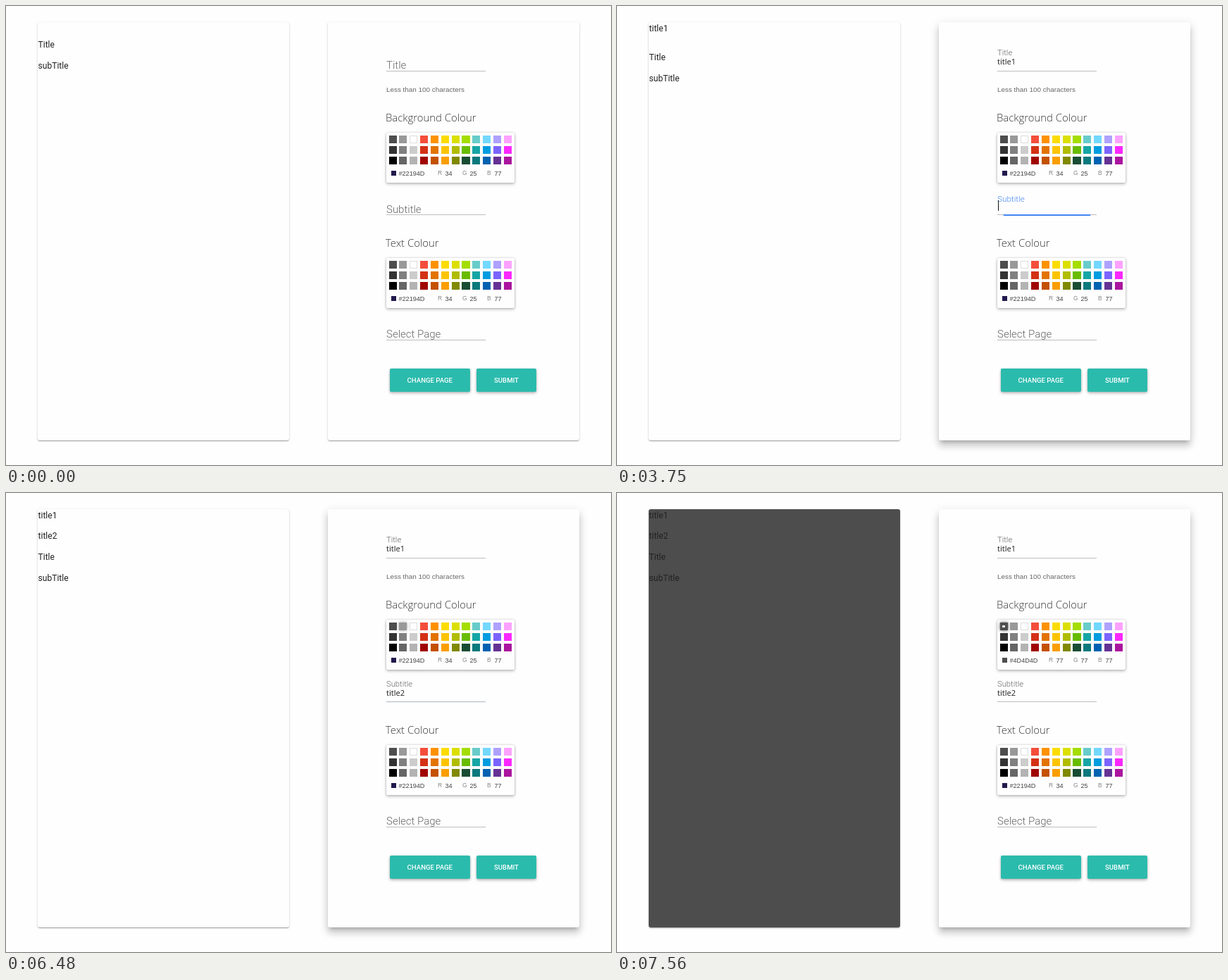
Write an HTML page that moves like this. It is 859 px wide and 652 px high and loops after 8000 ms.

```html
<!DOCTYPE html>
<html lang="en">
<head>
<meta charset="utf-8">
<title>Live form preview</title>
<style>
  html, body { margin: 0; width: 100%; height: 100%; overflow: hidden; background: #fefefe; }
  #stage { position: relative; width: 859px; height: 652px; overflow: hidden; font-family: Roboto, sans-serif; }
  #stage div, #stage i { position: absolute; box-sizing: border-box; }
  .text { line-height: 20px; white-space: pre; }
  .card {
    top: 23px; width: 357px; height: 593.5px; border-radius: 3px; background: #fefefe;
    box-shadow: 0 1px 3px rgba(0,0,0,.2), 0 1px 1px rgba(0,0,0,.14), 0 2px 1px -1px rgba(0,0,0,.12);
  }
  .card.raised { box-shadow: 0 5px 5px -3px rgba(0,0,0,.2), 0 8px 10px 1px rgba(0,0,0,.14), 0 3px 14px 2px rgba(0,0,0,.08); }
  .preview { font-size: 12.1px; color: #222; }
  .heading { font: 300 14.9px/20px "Open Sans", sans-serif; color: #333; }
  .hint { font: 9.9px/20px "Liberation Sans", Arial, sans-serif; color: #666; }
  .label { font-size: 15px; font-weight: 300; color: #666; transform-origin: 0 50%; }
  .input { font: 11.1px/20px "Open Sans", sans-serif; color: #222; }
  .caret { width: 1px; height: 15px; margin-left: 1px; top: 2px; background: #111; }
  .line { left: 540px; width: 141px; height: 1px; background: #bdbdbd; }
  .focus { left: 540px; width: 141px; height: 2px; background: #4285f4; }
  .picker {
    left: 540px; width: 182px; height: 71px; border-radius: 2px; background: #fefefe;
    box-shadow: 0 2px 4px rgba(0,0,0,.25), 0 0 3px rgba(0,0,0,.18);
  }
  .swatch { width: 11.1px; height: 11.1px; }
  .dot { left: 3.7px; top: 3.7px; width: 3.7px; height: 3.7px; border-radius: 1px; }
  .sample { left: 7px; top: 54px; width: 6.5px; height: 6.5px; }
  .value { font: 9.1px/20px "Liberation Sans", Arial, sans-serif; color: #444; overflow: hidden; }
  .channel { font: 8.5px/20px "Liberation Sans", Arial, sans-serif; color: #888; }
  .menu {
    left: 540px; width: 190px; overflow: hidden; border-radius: 2px; background: #fefefe;
    box-shadow: 0 2px 4px rgba(0,0,0,.22), 0 0 3px rgba(0,0,0,.18);
  }
  .option { left: 12px; font: 12.4px/20px "Open Sans", sans-serif; color: #111; }
  .button {
    top: 514.5px; height: 33.5px; border-radius: 2px; background: #2bbbad; color: #fff;
    font-size: 9.6px; font-weight: 500; line-height: 33px; text-align: center;
    box-shadow: 0 2px 4px rgba(0,0,0,.22), 0 1px 3px rgba(0,0,0,.14);
  }
</style>
</head>
<body>
<div id="stage"></div>
<script>
const LOOP = 8000, PITCH = 35.7, INDIGO = '#22194D';
const stage = document.getElementById('stage');

const COLORS = (
  '4D4D4D 999999 FFFFFF F44E3B FE9200 FCDC00 DBDF00 A4DD00 68CCCA 73D8FF AEA1FF FDA1FF ' +
  '333333 808080 CCCCCC D33115 E27300 FCC400 B0BC00 68BC00 16A5A5 009CE0 7B64FF FA28FF ' +
  '000000 666666 B3B3B3 9F0500 C45100 FB9E00 808900 194D33 0C797D 0062B1 653294 AB149E'
).split(' ').map(c => '#' + c);

function add(parent, cls, style = {}, content = '') {
  const el = document.createElement('div');
  el.className = cls;
  el.textContent = content;
  for (const [k, v] of Object.entries(style))
    el.style[k] = typeof v === 'number' ? v + 'px' : v;
  return parent.appendChild(el);
}

// y is the middle of the capital letters
const text = (parent, cls, x, y, content) =>
  add(parent, 'text ' + cls, { left: x, top: y - 10 }, content);

const within = (t, a, b) => t >= a && t < b;
const easeOut = (t, start, span) =>
  1 - (1 - Math.min(1, Math.max(0, (t - start) / span))) ** 3;

const panel = add(stage, 'card', { left: 45 });
const form = add(stage, 'card', { left: 456.5 });
const preview = ['', '', 'Title', 'subTitle'].map(s => text(stage, 'preview', 45.5, 0, s));

text(stage, 'hint', 540, 118.5, 'Less than 100 characters');
text(stage, 'heading', 539, 157.5, 'Background Colour');
text(stage, 'heading', 539, 335.5, 'Text Colour');
text(stage, 'label', 540, 466, 'Select Page');
add(stage, 'line', { top: 474 });
add(stage, 'button', { left: 544.5, width: 114.5 }, 'CHANGE PAGE');
add(stage, 'button', { left: 668, width: 85 }, 'SUBMIT');

function makePicker(top) {
  const box = add(stage, 'picker', { top });
  const swatches = COLORS.map((color, i) => add(box, 'swatch', {
    left: 3.5 + i % 12 * 14.85,
    top: 4 + Math.floor(i / 12) * 14.85,
    background: color,
    boxShadow: color === '#FFFFFF' ? 'inset 0 0 0 1px #ddd' : 'none'
  }));
  const sample = add(box, 'sample');
  const hex = text(box, 'value', 17.5, 58, '');
  const channels = ['R', 'G', 'B'].map((name, i) => {
    text(box, 'channel', 73 + i * 35, 57, name);
    const value = text(box, 'value', 83.5 + i * 35, 58, '');
    value.style.width = '14px';
    return value;
  });
  const dot = add(box, 'dot');
  return {
    set(color) {
      sample.style.background = color;
      hex.textContent = color;
      channels.forEach((el, i) => {
        el.textContent = parseInt(color.substr(1 + i * 2, 2), 16);
      });
      const index = COLORS.indexOf(color);
      dot.style.display = index < 0 ? 'none' : '';
      if (index >= 0) {
        dot.style.background = index === 0 ? '#fff' : '#000';
        swatches[index].append(dot);
      }
    },
    hover(index) {
      [0, 1].forEach(i => {
        swatches[i].style.boxShadow = i === index ? '0 0 4px ' + COLORS[i] : 'none';
      });
    }
  };
}

const background = makePicker(180);
makePicker(358).set(INDIGO);

function makeField(f) {
  add(stage, 'line', { top: f.line });
  const focus = add(stage, 'focus', { top: f.line });
  const label = text(stage, 'label', 540, f.y, f.label);
  const input = text(stage, 'input', 540, f.y - 4.7, '');
  const value = input.appendChild(document.createElement('span'));
  const caret = input.appendChild(document.createElement('i'));
  caret.className = 'caret';
  const menu = add(stage, 'menu', { top: f.line + 2, zIndex: 2 });
  const options = f.items.map(s => text(menu, 'option', 12, 0, s));

  return t => {
    const typed = f.value.slice(0, f.keys.filter(k => t >= k).length);
    const active = within(t, f.focus, f.blur);
    const rise = easeOut(t, f.focus, 250);
    label.style.transform = `translateY(${-17.3 * rise}px) scale(${1 - rise / 4})`;
    label.style.color = active ? '#4285f4' : '#666';
    focus.style.transform = `scaleX(${rise})`;
    focus.style.opacity = 1 - easeOut(t, f.blur, 150);
    value.textContent = typed;
    const hidden = f.blinks.some(([a, b]) => within(t, a, b));
    caret.style.display = active && !hidden ? '' : 'none';

    const closing = f.closing && within(t, ...f.closing);
    let row = 0;
    options.forEach((el, i) => {
      const shown = closing ? i < 2 : f.items[i].toLowerCase().startsWith(typed);
      el.style.display = shown ? '' : 'none';
      if (shown) el.style.top = 16 + PITCH * row++ + 'px';
    });
    menu.style.display = within(t, f.open, f.close) ? '' : 'none';
    menu.style.height = (closing ? 93.5 : 16 + PITCH * row) + 'px';
    menu.style.clipPath = closing ? 'inset(-8px -8px 0 -8px)' : 'none';
    return typed;
  };
}

const titleAt = makeField({
  label: 'Title', y: 84, line: 92, value: 'title1',
  keys: [1620, 1740, 1860, 2010, 2130, 2490],
  focus: 640, blur: 3480, open: 840, close: 2490,
  blinks: [[1110, 1620], [3000, 3480]],
  items: ['test', 'test2', 'title2', 'TITLE', 'Title', 'Test']
});

const subtitleAt = makeField({
  label: 'Subtitle', y: 289, line: 296, value: 'title2',
  keys: [4170, 4440, 4560, 4650, 4740, 5130],
  focus: 3626, blur: 6390, open: 3810, close: 5130, closing: [4440, 4500],
  blinks: [[5640, 6150]],
  items: ['test2', 'test3', 'title', 'Title', 'test4', 'test5']
});

function draw(t) {
  form.classList.toggle('raised', t >= 240);
  const title = titleAt(t), subtitle = subtitleAt(t);
  const top = title ? 18 : 0, sub = subtitle ? 18 : 0;
  preview[0].textContent = title;
  preview[1].textContent = subtitle;
  [31.5, 61, 55 + top + sub, 85 + top + sub].forEach((y, i) => {
    preview[i].style.top = y - 10 + 'px';
  });

  const color = t >= 7560 ? COLORS[0] : t >= 6540 ? COLORS[1] : INDIGO;
  background.set(color);
  background.hover(t >= 7470 ? 0 : within(t, 6450, 6990) ? 1 : -1);
  panel.style.background = color === INDIGO ? '#fefefe' : color;
}

const start = performance.now();
function tick() {
  draw((performance.now() - start) % LOOP);
  requestAnimationFrame(tick);
}
tick();
</script>
</body>
</html>
```
